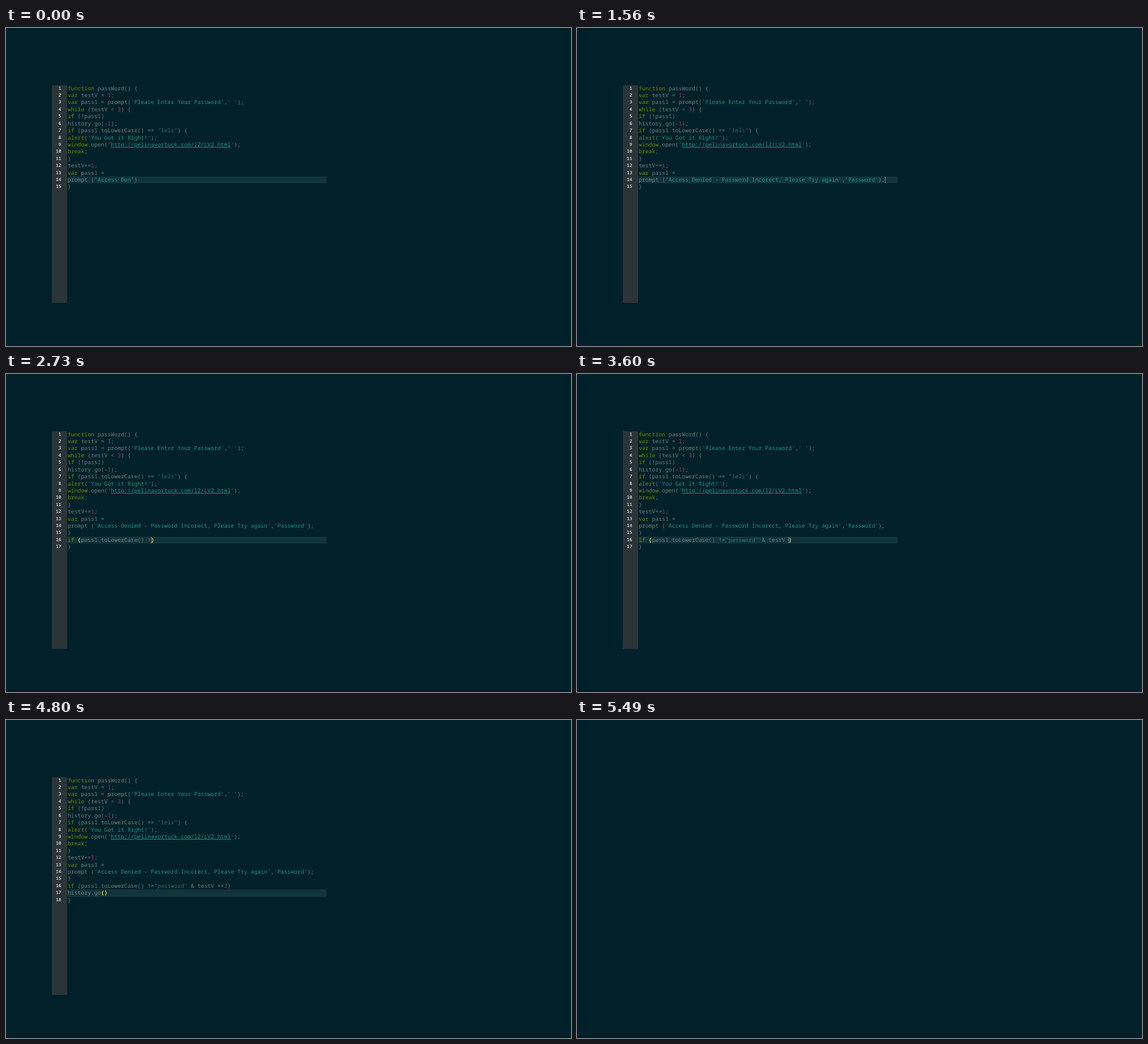
Write an HTML page that moves like this. It is 998 px wide and 561 px high and loops after 5790 ms.

```html
<!DOCTYPE html>
<html lang="en">
<head>
<meta charset="utf-8">
<title>Typing code</title>
<style>
  html, body { margin: 0; width: 100%; height: 100%; overflow: hidden; background: #002129; }
  #editor {
    position: absolute; left: 0; top: 0; width: 998px; height: 561px; overflow: hidden;
    font: 9.808px/12.42px "Noto Sans Mono", "DejaVu Sans Mono", monospace;
    font-kerning: none; font-variant-ligatures: none;
    text-rendering: geometricPrecision; color: #6f7f81; white-space: pre;
  }
  #gutter { position: absolute; left: 81px; top: 101px; width: 27px; height: 384px; background: #2b3538; }
  .row { position: absolute; left: 108.9px; height: 12.42px; }
  .num {
    position: absolute; left: 81px; width: 16.6px; height: 12.42px;
    text-align: right; font-size: 8px; font-weight: bold; color: #c3cbcb;
  }
  #active { position: absolute; left: 108px; width: 458px; height: 12.2px; background: #12343b; }
  #caret { position: absolute; width: 1px; height: 11.5px; background: #7d8c8e; }
  .key { color: #748600; }
  .str { color: #269189; }
  .dbl { color: #2a6f70; }
  .dig { color: #b82f71; }
  .url { color: #269189; text-decoration: underline; }
  .match { color: #f0e24c; font-weight: bold; }
</style>
</head>
<body>
<div id="editor">
  <div id="gutter"></div>
  <div id="active"></div>
  <div id="rows"></div>
  <div id="caret"></div>
</div>
<script>
const LOOP = 5790, BLANK = 5490;
const TOP = 100.6, PITCH = 12.42, LEFT = 108.9, ADVANCE = 9.808 * 0.6;

const opening = `function passWord() {
var testV = 1;
var pass1 = prompt('Please Enter Your Password',' ');
while (testV < 3) {
if (!pass1)
history.go(-1);
if (pass1.toLowerCase() == "lels") {
alert('You Got it Right!');
window.open('http://pelinavortuck.com/l2/LV2.html');
break;
}
testV+=1;
var pass1 =`.split("\n");

// [time of first key, time of last key, typed text, text right of the caret]
const keys = [
  [30, 900, "ied - Password Incorect, Please Try again", "')"],
  [920, 920, "'", ")"],
  [985, 985, ",", ")"],
  [1040, 1440, "'Password", "')"],
  [1470, 1560, "');", ""],
  [1600, 1600, "\n", ""],
  [1650, 1650, "}", ""],
  [1700, 1700, "\n", ""],
  [1740, 1800, "if ", ""],
  [1820, 2610, "(pass1.toLowerCase", ")"],
  [2640, 2640, "(", "))"],
  [2665, 2725, ") !", ")"],
  [2755, 2755, "=", ")"],
  [2780, 2990, '"password', '")'],
  [3030, 3580, '" & testV ', ")"],
  [3640, 3860, "==3", ")"],
  [3920, 3920, ")", ""],
  [3980, 3980, "\n", ""],
  [4040, 4600, "history.go", ""],
  [4660, 4660, "(", ")"],
  [4820, 4890, "-1", ")"],
  [4950, 5010, ");", ""],
  [5100, 5100, "\n", ""]
];

const el = id => document.getElementById(id);
const escape = s => s.replace(/&/g, "&amp;").replace(/</g, "&lt;");

function stateAt(t) {
  const lines = opening.slice();
  let left = "prompt ('Access Den", tail = "')";
  for (const [start, end, text, after] of keys) {
    if (t < start) break;
    if (text === "\n") {
      lines.push(left);
      left = "";
    } else {
      const p = t >= end ? 1 : (t - start) / (end - start);
      left += text.slice(0, 1 + Math.floor((text.length - 1) * p));
    }
    tail = after;
  }
  return { lines: [...lines, left + tail, "}"], row: lines.length, left, tail };
}

// Columns of the bracket pair next to the caret
function bracketPair(left, tail) {
  const text = left + tail;
  let close = -1;
  if (tail[0] === ")") close = left.length;
  else if (left.endsWith(")")) close = left.length - 1;
  if (close < 0) return [];
  let depth = 0;
  for (let i = close; i >= 0; i--) {
    if (text[i] === ")") depth++;
    if (text[i] === "(" && --depth === 0) return [i, close];
  }
  return [];
}

function colour(text, pair) {
  const kinds = Array(text.length).fill("");
  const mark = (re, kind) => {
    for (const m of text.matchAll(re)) kinds.fill(kind, m.index, m.index + m[0].length);
  };
  mark(/\b(function|var|while|if|break|alert|window)\b/g, "key");
  mark(/\b\d+\b/g, "dig");
  mark(/'[^']*'?/g, "str");
  mark(/"[^"]*"?/g, "dbl");
  mark(/http:[^']*/g, "url");
  for (const i of pair) kinds[i] = "match";

  let html = "";
  for (let i = 0, j; i < text.length; i = j) {
    for (j = i + 1; j < text.length && kinds[j] === kinds[i];) j++;
    html += `<span class="${kinds[i]}">${escape(text.slice(i, j))}</span>`;
  }
  return html;
}

let shown = "";
function draw(t) {
  el("editor").style.visibility = t >= BLANK ? "hidden" : "visible";
  const { lines, row, left, tail } = stateAt(t);
  const y = TOP + row * PITCH;
  el("active").style.top = y + "px";
  el("caret").style.top = y + 0.4 + "px";
  el("caret").style.left = LEFT + left.length * ADVANCE - 0.5 + "px";
  el("caret").style.opacity = t % 800 < 100 ? 0 : 1;

  const key = row + left + "|" + tail;
  if (key === shown) return;
  shown = key;
  const pair = bracketPair(left, tail);
  el("rows").innerHTML = lines.map((text, i) => {
    const top = `style="top:${(TOP + i * PITCH).toFixed(2)}px"`;
    return `<div class="num" ${top}>${i + 1}</div>` +
      `<div class="row" ${top}>${colour(text, i === row ? pair : [])}</div>`;
  }).join("");
}

const began = performance.now();
function tick() {
  draw((performance.now() - began) % LOOP);
  requestAnimationFrame(tick);
}
tick();
</script>
</body>
</html>
```
